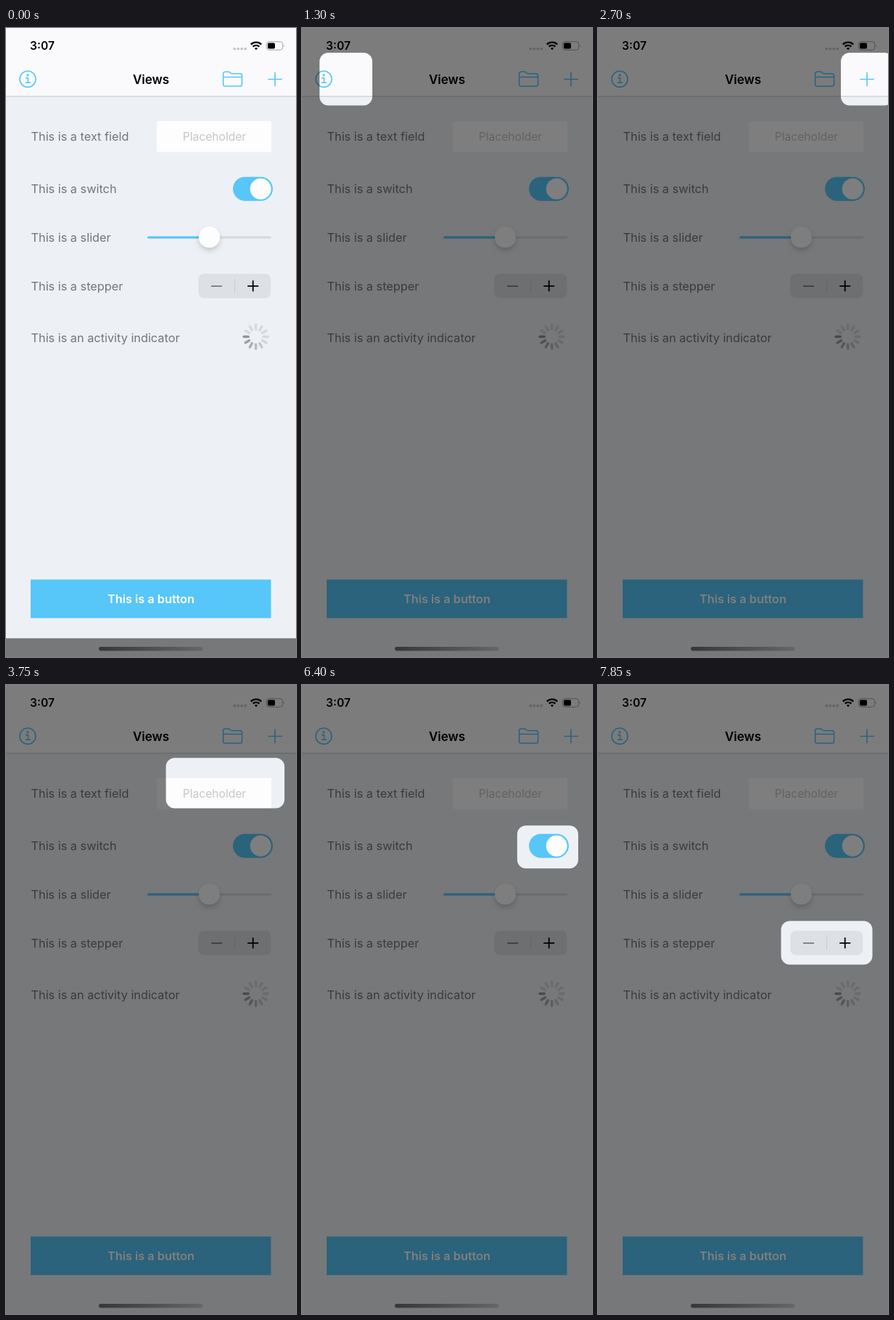
An HTML page for the animation above (8 s loop, 400 px wide and 865 px high).

```html
<!DOCTYPE html>
<html lang="en">
<head>
<meta charset="utf-8">
<style>
  html, body { margin: 0; width: 100%; height: 100%; overflow: hidden; background: #edf1f5; }
  svg { display: block; width: 400px; height: 865px; }
  text { font-family: Inter, Roboto, sans-serif; font-size: 16.3px; fill: #737578; }
  .bold { font-weight: 600; fill: #000; }
  .mid { text-anchor: middle; }
  .icon { fill: none; stroke: #57c6f9; stroke-width: 1.6; stroke-linecap: round; stroke-linejoin: round; }
</style>
</head>
<body>
<svg viewBox="0 0 400 865">
  <defs>
    <filter id="shadow" x="-50%" y="-50%" width="200%" height="200%">
      <feDropShadow dx="0" dy="4" stdDeviation="3.5" flood-opacity=".18"/>
    </filter>
    <linearGradient id="bar"><stop stop-color="#373738"/><stop offset="1" stop-color="#666667"/></linearGradient>
  </defs>
  <rect width="400" height="865" fill="#edf1f5"/>

  <!-- status and navigation bars -->
  <rect width="400" height="94" fill="#fafafc"/>
  <rect y="93.5" width="400" height="1" fill="#c3c5c8"/>
  <text class="bold" x="33" y="30" style="font-size:15.6px">3:07</text>
  <g fill="#c6c6c8">
    <circle cx="315.2" cy="28.6" r="1.9"/><circle cx="320.2" cy="28.6" r="1.9"/>
    <circle cx="325.2" cy="28.6" r="1.9"/><circle cx="330.2" cy="28.6" r="1.9"/>
  </g>
  <g fill="none" stroke="#000" stroke-width="2.3">
    <path d="M337.8 22.6a10.3 10.3 0 0 1 14.4 0M340.6 25.6a6.3 6.3 0 0 1 8.8 0"/>
    <path d="M345 30.3l-2.1-2.2a3 3 0 0 1 4.2 0z" fill="#000" stroke="none"/>
  </g>
  <rect x="359.3" y="18.8" width="22.4" height="11.4" rx="3.4" fill="none" stroke="#a2a2a4"/>
  <rect x="361" y="20.5" width="10" height="8" rx="1.8"/>
  <path d="M383 22.6q1.6 1.9 0 3.8z" fill="#a2a2a4"/>
  <text class="bold mid" x="200" y="76.5" style="font-size:17px">Views</text>
  <g class="icon">
    <circle cx="30" cy="70.3" r="11"/>
    <path d="M27.6 68.6h2.9v6.6m-3.2 0h6.2"/>
    <circle cx="30" cy="64.8" r=".8" fill="#57c6f9"/>
    <path d="M299.6 63q0-2.7 2.7-2.7h4.8q1.2 0 2 .9l.9.9q.7.6 1.8.6h11q2.7 0 2.7 2.7v11.9q0 2.7-2.7 2.7h-20.500q-2.700 0-2.700-2.700zM299.600 67.500h25.900M361.800 70.500h18.600M371.100 61.200v18.600"/>
  </g>

  <!-- form rows -->
  <text x="34.500" y="155">This is a text field</text>
  <text x="34.500" y="227">This is a switch</text>
  <text x="34.500" y="293.500">This is a slider</text>
  <text x="34.500" y="360.500">This is a stepper</text>
  <text x="34.500" y="431.500">This is an activity indicator</text>

  <rect x="208" y="128" width="158" height="42.500" fill="#fdfdfe"/>
  <text class="mid" x="287.500" y="155" style="font-size:15.600px;fill:#c5c6c8">Placeholder</text>

  <rect x="313" y="204.700" width="55" height="33" rx="16.500" fill="#57c6f9"/>
  <circle cx="351.200" cy="221.200" r="14.500" fill="#fdfdfe"/>

  <rect x="195" y="286.500" width="171" height="3" rx="1.500" fill="#d6d9dd"/>
  <rect x="195" y="286.500" width="86" height="3" rx="1.500" fill="#57c6f9"/>
  <circle cx="280.500" cy="287.500" r="14.500" fill="#fdfdfe" filter="url(#shadow)"/>

  <rect x="265.300" y="338" width="100" height="33.500" rx="8" fill="#dde0e4"/>
  <rect x="315" y="345" width="1" height="19" fill="#c6c9cd"/>
  <path d="M283 355h15" stroke="#7b7d80" stroke-width="1.800"/>
  <path d="M333.200 354.800h15M340.700 347.300v15" stroke="#000" stroke-width="1.800"/>

  <g id="spinner" stroke-width="3.500" stroke-linecap="round" transform="translate(344.600 424.600)"/>

  <rect x="34" y="758.500" width="331.500" height="53" fill="#57c6f9"/>
  <text class="mid" x="200" y="791" style="font-weight:600;fill:#fff">This is a button</text>

  <path id="dim" fill-opacity=".5" fill-rule="evenodd"/>
  <rect x="128" y="851" width="143.500" height="5.500" rx="2.750" fill="url(#bar)"/>
</svg>
<script>
const LOOP = 8000, STEP = 50, RADIUS = 12;

// Highlight boxes: left, top, right, bottom
const boxes = [
  [-40, -60, 441, 875],
  [-6, 34, 66, 106.5],
  [273, 34, 352, 106.5],
  [335, 34, 407, 106.5],
  [195, 115, 379, 183.5],
  [300, 191.5, 381, 250.5],
  [180, 259, 380.5, 317.5],
  [252.5, 324.5, 378.5, 384.5]
];

// Moves between boxes: first visible time, time already elapsed then, duration
const moves = [
  [0, 38, 250], [1300, 78, 340], [2500, 40, 240], [3600, 40, 270],
  [5150, 82, 250], [6400, 30, 260], [7600, 30, 260]
];

const dim = document.getElementById('dim');

// Ease-in-out: cubic-bezier(.42, 0, .58, 1), solved by bisection
function ease(x) {
  if (x >= 1) return 1;
  let lo = 0, hi = 1;
  for (let i = 0; i < 24; i++) {
    const s = (lo + hi) / 2, r = 1 - s;
    if (1.26 * s * r * r + 1.74 * s * s * r + s ** 3 < x) lo = s; else hi = s;
  }
  return lo * lo * (3 - 2 * lo);
}

function boxAt(t) {
  const i = moves.findLastIndex(m => t >= m[0]);
  const [at, lead, duration] = moves[i];
  const p = ease((t - at + lead) / duration);
  return boxes[i].map((v, k) => v + (boxes[i + 1][k] - v) * p);
}

function roundRect([l, t, r, b]) {
  const c = (x, y) => `a${RADIUS} ${RADIUS} 0 0 1 ${x * RADIUS} ${y * RADIUS}`;
  return `M${l + RADIUS} ${t}H${r - RADIUS}${c(1, 1)}V${b - RADIUS}${c(-1, 1)}` +
         `H${l + RADIUS}${c(-1, -1)}V${t + RADIUS}${c(1, -1)}z`;
}

function draw(now) {
  const t = Math.floor(now % LOOP / STEP) * STEP;
  // The outer path surrounds every box so that even-odd filling cuts a hole
  dim.setAttribute('d', 'M-100-100H500V965H-100z' + roundRect(boxAt(t)));
  requestAnimationFrame(draw);
}

// Spokes fade anticlockwise from the one pointing left
document.getElementById('spinner').innerHTML = Array.from({ length: 12 }, (_, i) => {
  const shade = Math.min(214, 146 + i * 13);
  return `<path d="M-10.5 0H-16.500" stroke="rgb(${shade},${shade + 2},${shade + 5})" transform="rotate(${-30 * i})"/>`;
}).join('');

draw(performance.now());
</script>
</body>
</html>
```
